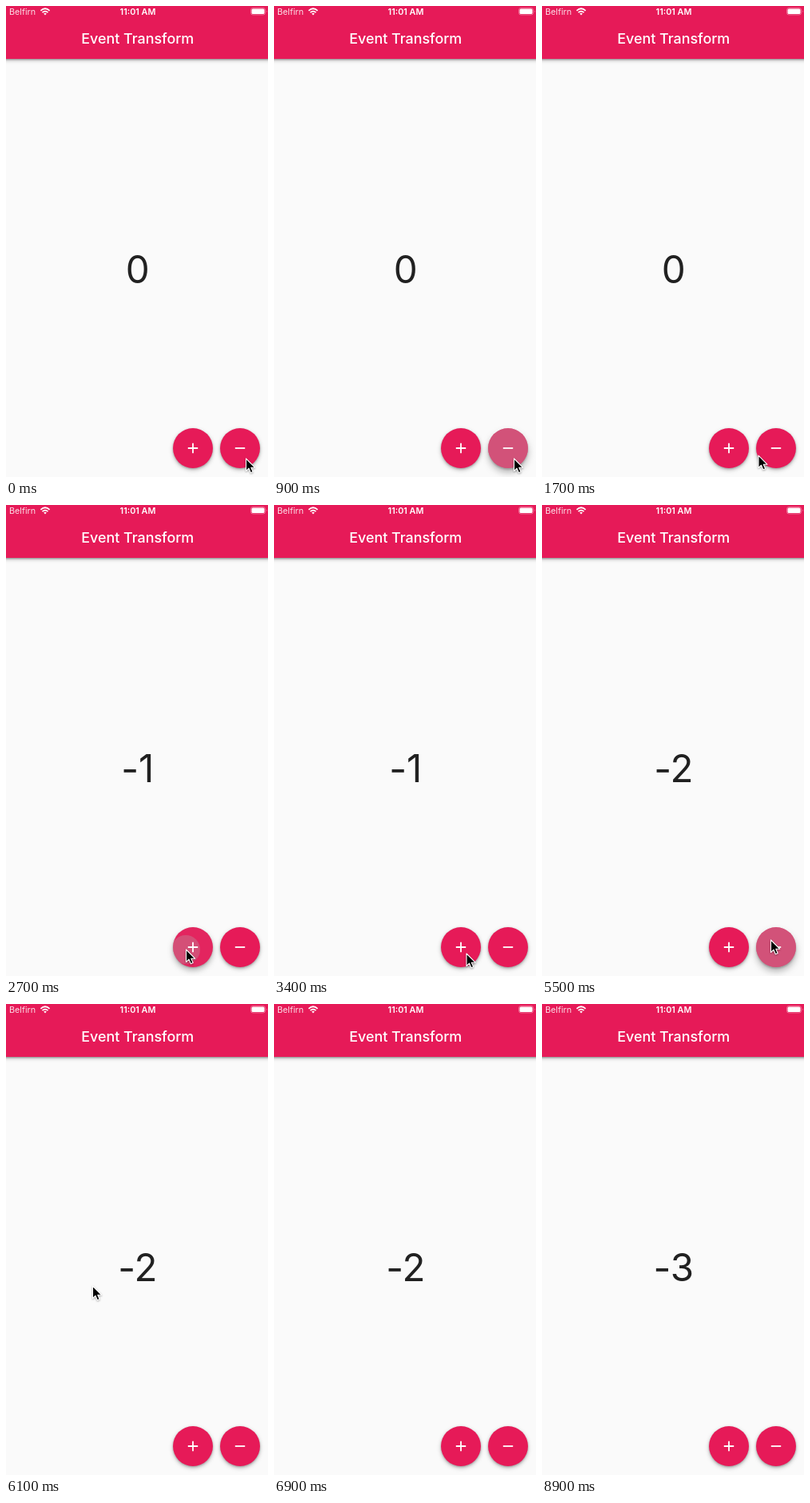
An HTML page that plays this animation: 328 by 588 pixels, repeating every 9.3 s.

```html
<!DOCTYPE html>
<html lang="en">
<head>
<meta charset="utf-8">
<title>Event Transform</title>
<style>
  html, body { margin: 0; width: 100%; height: 100%; overflow: hidden; background: #fafafa; }
  svg { display: block; width: 100%; height: 100%; font-family: Inter, Roboto, sans-serif; }
  .bar { fill: #e61a58; filter: drop-shadow(0 1px 1px #0005) drop-shadow(0 2px 2px #0003); }
  .status { font-size: 10.8px; fill: #fff; }
  .title { font-size: 17.9px; font-weight: 500; fill: #fff; }
  .count { font-size: 47.5px; fill: #212121; }
  .fab { fill: #e61a58; }
  .icon { stroke: #fff; stroke-width: 1.8; fill: none; }
  .wifi { stroke: #fff; stroke-width: 1.7; fill: none; }
  .tint { fill: #b1b1b1; }
  .cursor { filter: drop-shadow(0 1px 1px #0005); }
</style>
</head>
<body>
<svg viewBox="0 0 328 588">
  <defs>
    <clipPath id="disc"><circle r="25"/></clipPath>
  </defs>
  <rect width="328" height="588" fill="#fafafa"/>
  <rect class="bar" x="-8" y="-8" width="344" height="74"/>

  <text class="status" x="4" y="11" opacity=".85">Belfirn</text>
  <g class="wifi">
    <path d="M43.4 5.8Q49 .7 54.6 5.8"/>
    <path d="M45.5 8.1Q49 5 52.5 8.1"/>
    <path d="M47.2 9.4L49 11.6L50.8 9.4Q49 8.2 47.2 9.4Z" fill="#fff" stroke="none"/>
  </g>
  <text class="status" x="165" y="11" text-anchor="middle" font-weight="600">11:01 AM</text>
  <rect x="306.5" y="2.5" width="18" height="8.5" rx="2.5" fill="none" stroke="#fff" stroke-opacity=".35"/>
  <rect x="307.5" y="3.5" width="16" height="6.5" rx="1.5" fill="#fff"/>
  <path d="M326 5.2q1.4 1.5 0 3z" fill="#fff" opacity=".5"/>

  <text class="title" x="164.7" y="47" text-anchor="middle">Event Transform</text>
  <text class="count" x="164.8" y="346.4" text-anchor="middle"><tspan id="sign" dy="2.6"></tspan><tspan id="digit">0</tspan></text>

  <g id="plus" transform="translate(234 552)">
    <circle class="fab" r="25"/>
    <g clip-path="url(#disc)"><circle class="tint" r="25"/><circle class="tint"/></g>
    <path class="icon" d="M-6.2 0H6.2M0-6.2V6.2"/>
  </g>
  <g id="minus" transform="translate(293 552)">
    <circle class="fab" r="25"/>
    <g clip-path="url(#disc)"><circle class="tint" r="25"/><circle class="tint"/></g>
    <path class="icon" d="M-6.2 0H6.2"/>
  </g>

  <path id="cursor" class="cursor" d="M.5 0V15.5L4 12.2L6.4 17.8L9.2 16.6L6.8 11.2H11.6Z"
    stroke="#fff" stroke-width="1.1" stroke-linejoin="round"/>
</svg>
<script>
const LOOP = 9300, STEP = 100, FAB_Y = 552;
const $ = id => document.getElementById(id);
const clamp = v => Math.max(0, Math.min(1, v));
const mix = (a, b, k) => a + (b - a) * k;
const ease = k => k * k * (3 - 2 * k);

// resting places of the pointer tip
const spot = {
  start: [300, 565], plus: [225, 555], plusEdge: [240.5, 560], minus: [286, 543],
  count: [160, 338], below: [108, 352], right: [212, 350], away: [335, 540]
};
// begin, end, destination
const moves = [
  [1400, 2100, "plus"], [2800, 3000, "minus"], [3200, 3400, "plusEdge"],
  [3600, 3900, "minus"], [4100, 4800, "count"], [4800, 5100, "minus"],
  [5700, 6100, "below"], [6100, 6500, "right"], [6600, 6900, "away"],
  [7700, 8000, "minus"], [8700, 8900, "away"]
];
const drops = [2400, 4600, 8400];
const fabs = [
  { el: $("plus"), x: 234, taps: [2700] },
  { el: $("minus"), x: 293, taps: [300, 700, 3000, 5300, 5600] }
];

function pointer(t) {
  let pos = spot.start;
  for (const [from, to, name] of moves) {
    const k = ease(clamp((t - from) / (to - from)));
    pos = pos.map((v, i) => mix(v, spot[name][i], k));
  }
  return pos;
}

function drawFab({ el, x, taps }, t) {
  const [disc, clip] = el.children;
  const [glow, wave] = clip.children;
  const tap = taps.filter(s => s <= t).pop();
  const age = tap === undefined ? 400 : t - tap;
  const on = clamp((400 - age) / 150);
  const lift = on * clamp(.7 + age / 400);
  glow.setAttribute("opacity", .1 * lift);
  wave.setAttribute("opacity", .3 * on);
  if (on) {
    const [px, py] = pointer(tap);
    wave.setAttribute("cx", px - x);
    wave.setAttribute("cy", py - FAB_Y);
    wave.setAttribute("r", mix(18, 52, clamp(age / 200)));
  }
  disc.style.filter = `drop-shadow(0 ${1 + lift}px 1px #0003)
    drop-shadow(0 ${2.5 + 2.5 * lift}px ${2.5 + 1.5 * lift}px #0004)`;
}

function frame(time) {
  const t = Math.floor(time % LOOP / STEP) * STEP;
  const count = drops.filter(d => d <= t).length;
  $("cursor").setAttribute("transform", `translate(${pointer(t)})`);
  $("sign").textContent = count ? "-" : "";
  $("digit").textContent = count;
  $("digit").setAttribute("dy", count ? -2.6 : 0);
  fabs.forEach(f => drawFab(f, t));
}

const start = performance.now();
function tick() {
  frame(performance.now() - start);
  requestAnimationFrame(tick);
}
tick();
</script>
</body>
</html>
```
